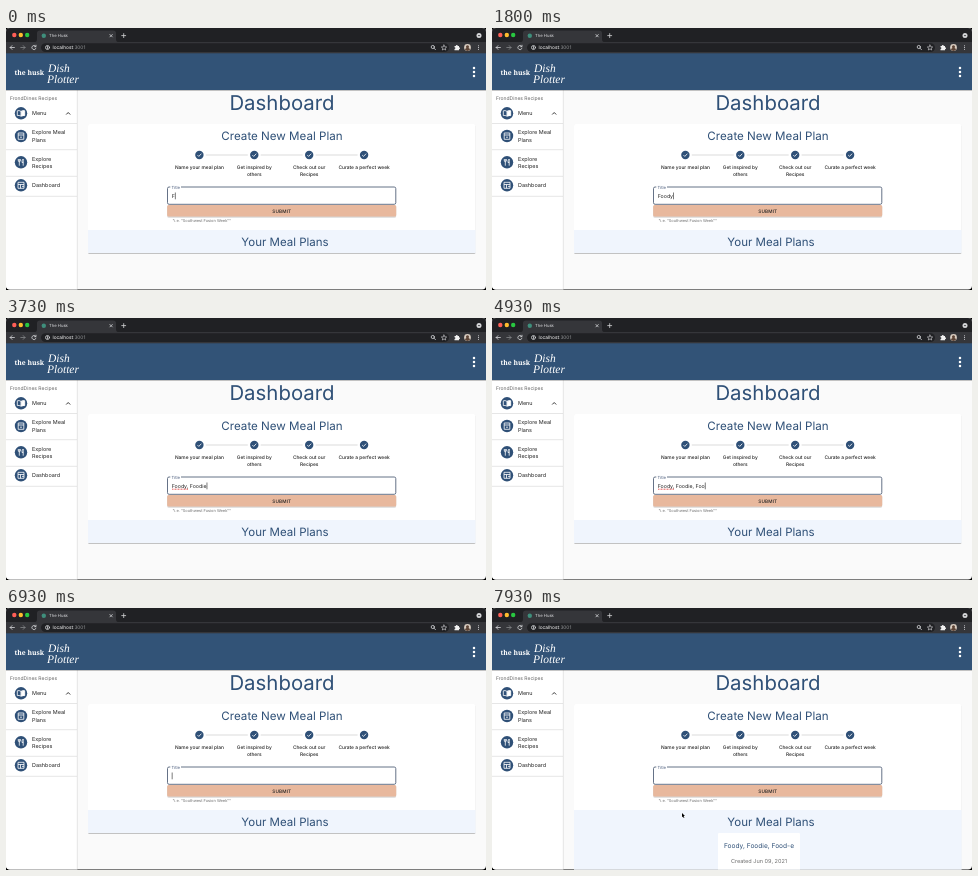
An HTML page for the animation above (8000 ms loop, 480 by 262 pixels).

```html
<!DOCTYPE html>
<html lang="en">
<head>
<meta charset="utf-8">
<title>Meal plan dashboard</title>
<style>
  html, body { margin: 0; width: 100%; height: 100%; overflow: hidden; background: #000; }
  svg { display: block; width: 100%; height: 100%; }
  text { font-family: Inter, Roboto, sans-serif; white-space: pre; text-rendering: geometricPrecision; }
  .mid { text-anchor: middle; }
  .blue { fill: #2f5077; }
  .side { font-size: 5.45px; fill: #222; }
  .label { font-size: 4.85px; font-weight: 500; fill: #222; }
  .icon { fill: none; stroke: #fff; stroke-width: .8; }
  .tool { fill: none; stroke: #d5d6d8; stroke-width: .8; stroke-linecap: round; }
  .script { font: italic 11.5px "Liberation Serif", serif; fill: #fff; }
</style>
</head>
<body>
<svg viewBox="0 0 480 262">
  <defs>
    <clipPath id="window"><rect width="480" height="261.5" rx="4"/></clipPath>
    <filter id="shadow" x="-5%" y="-20%" width="110%" height="150%">
      <feDropShadow dx="0" dy=".7" stdDeviation=".7" flood-opacity=".32"/>
    </filter>
  </defs>
  <g clip-path="url(#window)">
    <rect width="480" height="262" fill="#fafafa"/>

    <!-- Sidebar -->
    <rect y="62" width="71" height="200" fill="#fff"/>
    <path d="M71.3 62V262M0 95.5H71M0 121.7H71M0 148.3H71M0 168.3H71" stroke="#dcdcdc" stroke-width=".7"/>
    <text x="4" y="71.7" font-size="5" fill="#666">FrondDines Recipes</text>
    <g class="blue">
      <circle cx="15" cy="85.3" r="6.2"/><circle cx="15" cy="108" r="6.2"/>
      <circle cx="15" cy="134.3" r="6.2"/><circle cx="15" cy="157.3" r="6.2"/>
    </g>
    <g class="icon">
      <path d="M15 83.4Q13 82 11.3 82.8V87.6Q13 87 15 88.2Q17 87 18.7 87.6V82.8Q17 82 15 83.4V88"/>
      <path d="M15.4 83.4L18.3 82.8V87.4L15.4 88Z" fill="#fff"/>
      <path d="M12.2 105H17.8V111.3H12.2ZM12.2 107H17.8M14 109.2H16"/>
      <path d="M12.3 131V133.2Q13.3 134.5 14.3 133.2V131M13.3 131V137.7M17.2 137.7V131Q15.8 132 16 134.5H17.2"/>
      <path d="M12 154.3H18V160.3H12ZM12 156.5H18M14.5 156.5V160.3M16 158.4H18"/>
    </g>
    <g class="side">
      <text x="26" y="87.2">Menu</text>
      <text x="26" y="106.2">Explore Meal</text><text x="26" y="114">Plans</text>
      <text x="26" y="132.6">Explore</text><text x="26" y="140.4">Recipes</text>
      <text x="26" y="159.2">Dashboard</text>
    </g>
    <path d="M60.2 86.5L62.2 84.5L64.2 86.5" fill="none" stroke="#222" stroke-width=".9"/>

    <!-- Main card -->
    <text class="mid blue" x="276" y="82" font-size="20.4">Dashboard</text>
    <rect id="card" x="82" y="96" width="387.5" height="129" rx="1.5" fill="#fff" filter="url(#shadow)"/>
    <rect id="plans" x="82" y="202" width="387.5" height="23" fill="#f0f5fd"/>
    <text class="mid blue" x="276" y="112" font-size="11.6">Create New Meal Plan</text>
    <g id="steps"></g>
    <rect x="161.5" y="159" width="228.3" height="17.3" rx="1.6" fill="#fff" stroke="#54627a" stroke-width=".9"/>
    <rect x="164.3" y="158" width="10.7" height="2" fill="#fff"/>
    <text x="165.5" y="160.6" font-size="4.2" fill="#46597a">Title</text>
    <text id="typed" x="165.7" y="169.8" font-size="5.25" fill="#222"></text>
    <path id="spelling" d="M166 171.2H182" stroke="#e0312f" stroke-width=".8" stroke-dasharray="1 .5"/>
    <rect id="caret" y="164.5" width=".6" height="6.8" fill="#222"/>
    <rect x="161.2" y="177" width="229" height="11.6" rx="1.5" fill="#e8b89d" filter="url(#shadow)"/>
    <text class="mid" x="275.8" y="184.5" font-size="4.7" font-weight="500" letter-spacing=".14" fill="#222">SUBMIT</text>
    <text x="166.5" y="194" font-size="3.95" fill="#6e6e6e">"i.e. "Southwest Fusion Week""</text>
    <text class="mid blue" x="279" y="218.4" font-size="11.5">Your Meal Plans</text>
    <g id="newPlan">
      <rect x="226" y="225" width="82" height="40" rx="1" fill="#fff"/>
      <text class="mid blue" x="267" y="240.3" font-size="6.6">Foody, Foodie, Food-e</text>
      <text class="mid" x="267" y="254.6" font-size="5.55" fill="#707070">Created Jun 09, 2021</text>
    </g>

    <!-- App header -->
    <rect y="25" width="480" height="37" fill="#305277" filter="url(#shadow)"/>
    <text x="8.5" y="47.3" font-size="6.8" fill="#fff" style="font-family:'Noto Serif',serif;font-weight:900">the husk</text>
    <text class="script" x="42" y="43.5">Dish</text>
    <text class="script" x="41" y="54.5">Plotter</text>
    <g fill="#fff"><circle cx="468" cy="40" r="1.25"/><circle cx="468" cy="44" r="1.25"/><circle cx="468" cy="48" r="1.25"/></g>

    <!-- Browser bar -->
    <rect width="480" height="14.2" fill="#202124"/>
    <path d="M28 14.2Q31 14.2 31 11V5Q31 2.5 34 2.5H107Q110 2.5 110 5V11Q110 14.2 113 14.2Z" fill="#35363a"/>
    <rect y="14" width="480" height="11.3" fill="#35363a"/>
    <rect x="35" y="15.2" width="408" height="8.8" rx="4.4" fill="#202124"/>
    <circle cx="8.3" cy="7" r="2.2" fill="#ff5f57"/>
    <circle cx="14.8" cy="7" r="2.2" fill="#febc2e"/>
    <circle cx="21.2" cy="7" r="2.2" fill="#28c840"/>
    <circle cx="37.8" cy="7.7" r="2.2" fill="#3f8f7c"/>
    <text x="43" y="9.3" font-size="4.2" fill="#dedfe1">The Husk</text>
    <g class="tool">
      <path d="M103.9 6.5L106.3 8.9M106.3 6.5L103.9 8.9M115.7 7.6H119.7M117.7 5.6V9.6"/>
      <path d="M8.4 19.5H4.2M6 17.6L4.2 19.5L6 21.4"/>
      <path d="M14.8 19.5H19M17.2 17.6L19 19.5L17.2 21.4" stroke="#85878a"/>
      <path d="M29.7 18.3A2.1 2.1 0 1 0 30 20.2M30 17.2V18.7H28.5"/>
      <circle cx="41.5" cy="19.5" r="2"/><path d="M41.5 19.4V20.5M41.5 18.4V18.5"/>
      <circle cx="426.8" cy="19" r="1.6"/><path d="M428 20.2L429.5 21.7"/>
      <path d="M438 17L438.8 18.8L440.7 19L439.2 20.2L439.7 22L438 21L436.3 22L436.8 20.2L435.3 19L437.2 18.8Z" stroke-width=".6"/>
    </g>
    <text x="46.5" y="21.2" font-size="4.8" fill="#fff">localhost<tspan fill="#95979a">:3001</tspan></text>
    <path d="M448.5 18H449.8A1 1 0 0 1 451.8 18H453V19.2A1 1 0 0 1 453 21.2V22.3H448.5V21A.9 .9 0 0 0 448.5 19.2Z" fill="#f1f1f1"/>
    <circle cx="461.5" cy="19.5" r="3.4" fill="#d7cbbf"/>
    <path d="M459 21.8Q459.3 20.2 460.6 20A1.5 1.5 0 1 1 462.4 20Q463.8 20.2 464 21.8A3.4 3.4 0 0 1 459 21.8Z" fill="#5d4436"/>
    <g fill="#d5d6d8"><circle cx="472.5" cy="17.7" r=".55"/><circle cx="472.5" cy="19.5" r=".55"/><circle cx="472.5" cy="21.3" r=".55"/></g>
    <circle cx="473" cy="7.5" r="2.5" fill="#d5d6d8"/>
    <path d="M472 7L473 8.1L474 7" fill="none" stroke="#202124" stroke-width=".7"/>

    <path id="pointer" stroke="#fff" stroke-width=".45" paint-order="stroke"/>
  </g>
</svg>
<script>
const LOOP = 8000, BLINK = 530, CLEAR = 6930, LISTED = 7270;
const PHRASE = "Foody, Foodie, Food-e";
const KEY_TIMES = [0, 200, 800, 870, 1800, 2270, 2530, 2730, 2930, 3000, 3470,
  3600, 3730, 4000, 4200, 4400, 4730, 4930, 5330, 5930, 6270];
const POINTERS = {
  beam: "M-1-3.5H1V-3H.35V3H1V3.5H-1V3H-.35V-3H-1Z",
  hand: "M-.5 0Q0-.6.5 0V2.3L2.8 2.8Q3.3 3 3.1 4L2.5 6H-.5L-2 3.8Q-1.6 3-.5 3.8Z",
  arrow: "M0 0V4.3L1 3.4L1.7 5L2.4 4.7L1.7 3.1H3Z"
};
const $ = id => document.getElementById(id);
const show = (id, visible) => $(id).setAttribute("visibility", visible ? "visible" : "hidden");

const steps = [["Name your meal plan"], ["Get inspired by", "others"],
  ["Check out our", "Recipes"], ["Curate a perfect week"]];
$("steps").innerHTML = steps.map((lines, i) => {
  const x = 193.4 + i * 54.9;
  return (i ? `<path d="M${x - 48.5} 127H${x - 6.5}" stroke="#c4c4c4" stroke-width=".6"/>` : "") +
    `<circle class="blue" cx="${x}" cy="127" r="4.2"/>
     <path class="icon" d="M${x - 1.9} 127.1l1.3 1.3 2.6-2.7"/>` +
    lines.map((line, n) => `<text class="mid label" x="${x}" y="${140.8 + n * 6.9}">${line}</text>`).join("");
}).join("");

function drawInput(t) {
  const count = t >= CLEAR ? 0 : KEY_TIMES.filter(k => k <= t).length;
  const lastKey = count ? KEY_TIMES[count - 1] : CLEAR;
  const typed = $("typed");
  typed.textContent = PHRASE.slice(0, count);
  $("caret").setAttribute("x", 165.8 + (count ? typed.getComputedTextLength() : 0));
  show("caret", Math.floor((t - lastKey) / BLINK) % 2 === 0);
  show("spelling", count > 5);
}

function drawPointer(t) {
  show("pointer", t >= 7530);
  const p = Math.max(0, Math.min(1, Math.floor((t - 7530) / 66) / 6));
  const eased = p * (2 - p);
  const x = 247 - 57 * eased, y = 167 + 38 * eased;
  const kind = y < 176 ? "beam" : y < 189 ? "hand" : "arrow";
  $("pointer").setAttribute("d", POINTERS[kind]);
  $("pointer").setAttribute("transform", `translate(${x} ${y})`);
}

function draw(t) {
  const listed = t >= LISTED;
  drawInput(t);
  show("newPlan", listed);
  $("card").setAttribute("height", listed ? 180 : 129);
  $("plans").setAttribute("height", listed ? 74 : 23);
  drawPointer(t);
}

const start = performance.now();
function tick() {
  draw((performance.now() - start) % LOOP);
  requestAnimationFrame(tick);
}
tick();
</script>
</body>
</html>
```
